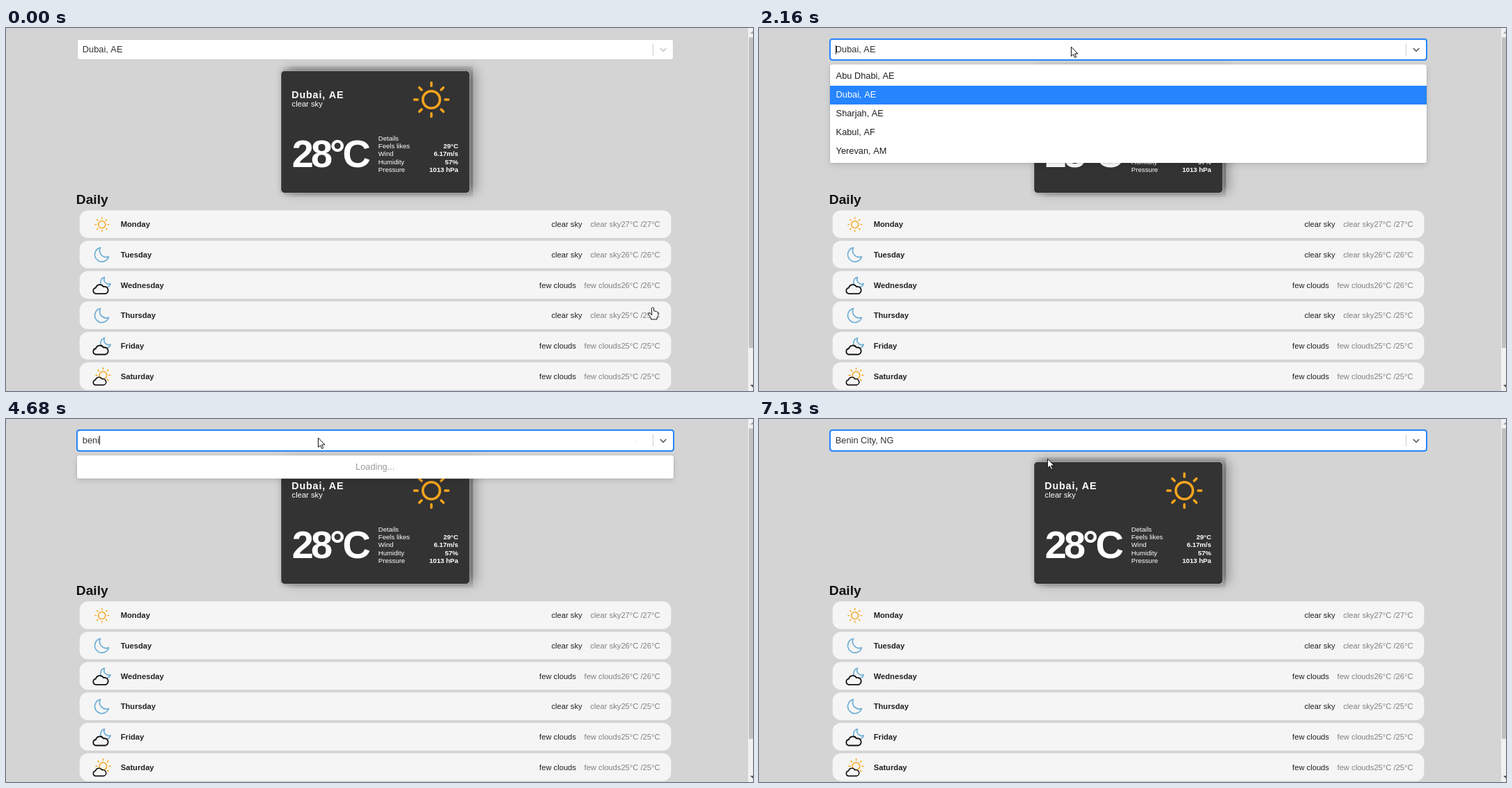
Write an HTML page with a canvas that moves like this. It is 1073 px wide and 522 px high and loops after 8 s.

```html
<!DOCTYPE html>
<html lang="en">
<head>
<meta charset="utf-8">
<title>Weather search</title>
<style>
html, body { margin: 0; width: 100%; height: 100%; overflow: hidden; background: #d4d4d4; }
canvas { display: block; width: 1073px; height: 522px; }
</style>
</head>
<body>
<canvas id="stage"></canvas>
<script>
const W = 1073, H = 522, LOOP = 8000, TICK = 65, BLINK = 490;
const FAMILY = '"Liberation Sans", Arial, sans-serif';
const canvas = document.getElementById('stage');
const ratio = window.devicePixelRatio || 1;
canvas.width = W * ratio;
canvas.height = H * ratio;
const c = canvas.getContext('2d');

const OPEN = 1180, LOADING = 2610, LOADED = 5340, PICK = 7000;
const BOX = { x: 102, y: 16, w: 857, h: 30 };
const typed = [[2540, 'b'], [2870, 'be'], [3200, 'ben'], [3690, 'beni'], [LOADED, 'benin']];
const cities = ['Abu Dhabi, AE', 'Dubai, AE', 'Sharjah, AE', 'Kabul, AF', 'Yerevan, AM'];
const details = [['Details', ''], ['Feels likes', '29°C'], ['Wind', '6.17m/s'],
  ['Humidity', '57%'], ['Pressure', '1013 hPa']];
const days = [
  ['Monday', 'clear sky', 27, sunIcon], ['Tuesday', 'clear sky', 26, moonIcon],
  ['Wednesday', 'few clouds', 26, cloudyMoon], ['Thursday', 'clear sky', 25, moonIcon],
  ['Friday', 'few clouds', 25, cloudyMoon], ['Saturday', 'few clouds', 25, cloudySun]
];
// time, x, y of the pointer tip
const track = [
  [0, 929, 401], [390, 560, 70], [520, 462, 1], [650, 453, 11], [910, 453, 11],
  [1040, 451, 20], [1235, 448, 27], [5980, 448, 27], [6240, 447, 19],
  [6720, 424, 54], [6890, 424, 54], [7085, 414, 57]
];

const moonPath = new Path2D('M-2 -10A10.2 10.2 0 1 0 10 3A9.5 9.5 0 0 1 -2 -10Z');
const cloudPath = new Path2D('M-7 6A4.3 4.3 0 0 1 -7 -2.5A6 6 0 0 1 4 -4A5 5 0 0 1 7 6Z');
const arrowPath = new Path2D('M.5 .5V13.6L3.5 10.8L5.7 15.6L7.8 14.7L5.6 10H9.6Z');
const handPath = new Path2D('M-1.5 1.6Q0 -.6 1.5 1.6V6Q3 5.2 4 6.6Q5.4 5.9 6 7.3' +
  'Q7.8 7 7.8 9V12.5L6 15.5V18H-2.5V16L-6.5 10.5Q-6.4 8.4 -4.3 9.3L-1.5 11.5Z');

function text(s, x, y, size, color, { bold, align = 'left', spacing = 0 } = {}) {
  c.font = `${bold ? 'bold ' : ''}${size}px ${FAMILY}`;
  c.textAlign = align;
  c.letterSpacing = spacing + 'px';
  c.fillStyle = color;
  c.fillText(s, x, y);
}

function box(x, y, w, h, r, color) {
  c.beginPath();
  c.roundRect(x, y, w, h, r);
  c.fillStyle = color;
  c.fill();
}

function shadowBox(x, y, w, h, r, color, dx, dy, blur, alpha) {
  c.save();
  c.shadowColor = `rgba(0,0,0,${alpha})`;
  c.shadowBlur = blur * ratio;
  c.shadowOffsetX = dx * ratio;
  c.shadowOffsetY = dy * ratio;
  box(x, y, w, h, r, color);
  c.restore();
}

function at(x, y, scale, draw) {
  c.save();
  c.translate(x, y);
  c.scale(scale, scale);
  c.lineCap = c.lineJoin = 'round';
  draw();
  c.restore();
}

function outline(path, fill, stroke, width) {
  if (fill) {
    c.fillStyle = fill;
    c.fill(path);
  }
  c.strokeStyle = stroke;
  c.lineWidth = width;
  c.stroke(path);
}

function sun(x, y, scale) {
  at(x, y, scale, () => {
    c.strokeStyle = '#f6a41c';
    c.lineWidth = 3.5;
    c.beginPath();
    c.arc(0, 0, 12.3, 0, 7);
    for (let i = 0; i < 8; i++) {
      const a = i * Math.PI / 4, dx = Math.cos(a), dy = Math.sin(a);
      c.moveTo(dx * 19.8, dy * 19.8);
      c.lineTo(dx * 24.5, dy * 24.5);
    }
    c.stroke();
  });
}

function moon(x, y, scale) {
  at(x, y, scale, () => outline(moonPath, null, '#70b0d6', 1.7 / scale));
}

function cloud(x, y, scale) {
  at(x, y, scale, () => outline(cloudPath, '#f5f5f5', '#111', 1.8));
}

function sunIcon(y) { sun(137.8, y + .4, .41); }
function moonIcon(y) { moon(137.5, y, 1); }
function cloudyMoon(y) { moon(143, y - 4, .72); cloud(136, y + 6.5, 1); }
function cloudySun(y) { sun(139.5, y - 1.5, .43); cloud(134.5, y + 7.5, .86); }

function drawCard() {
  shadowBox(394, 60.5, 273, 178, 6, '#333', 8, -1.6, 16, .3);
  // hide the spread rim under the card
  c.save();
  c.beginPath();
  c.rect(390, 55, 281, 188);
  c.roundRect(395.5, 62, 270, 175, 4.8);
  c.clip('evenodd');
  box(394, 60.5, 273, 178, 6, '#d4d4d4');
  shadowBox(394, -739.5, 273, 178, 6, '#333', 8, 798.4, 16, .3);
  c.restore();
  box(395.5, 62, 270, 175, 4.8, '#333');
  text('Dubai, AE', 410.2, 101, 14.4, '#fff', { bold: true, spacing: .8 });
  text('clear sky', 410.6, 113, 11.2, '#fff');
  text('28°C', 410.8, 200, 56, '#fff', { bold: true, spacing: -4 });
  sun(611, 103, 1);
  details.forEach(([name, value], i) => {
    const y = 162.2 + i * 11.1;
    text(name, 534.8, y, 9.6, '#fff');
    text(value, 649.6, y, 9.6, '#fff', { bold: true, align: 'right' });
  });
}

function drawDays() {
  text('Daily', 100.8, 253, 19.2, '#111', { bold: true });
  days.forEach(([day, sky, deg, icon], i) => {
    const y = 262.2 + i * 43.7, mid = y + 20;
    box(105.7, y, 849.7, 39.7, 12, '#f5f5f5');
    icon(mid);
    text(day, 164.7, mid + 4, 11.2, '#212121', { bold: true });
    const range = `${sky}${deg}°C /${deg}°C`;
    text(range, 939.6, mid + 4, 11.2, '#808080', { align: 'right' });
    const left = 939.6 - c.measureText(range).width;
    text(sky, left - 11.6, mid + 4, 11.2, '#212121', { align: 'right' });
  });
}

function drawScrollbar() {
  box(1066, 0, 7, H, 0, '#f1f1f1');
  box(1067, 13.5, 6, 446.5, 0, '#c1c1c1');
  c.fillStyle = '#a3a3a3';
  c.beginPath();
  c.moveTo(1069, 8);
  c.lineTo(1073, 4);
  c.lineTo(1073, 8);
  c.fill();
  c.fillStyle = '#505050';
  c.beginPath();
  c.moveTo(1069, 513);
  c.lineTo(1073, 513);
  c.lineTo(1073, 517);
  c.fill();
}

function drawSelect(t, tick, pointer) {
  const { x, y, w, h } = BOX;
  const focused = t >= OPEN;
  const hover = pointer.x >= x && pointer.x < x + w && pointer.y >= y && pointer.y < y + h;
  if (focused) box(x - 1, y - 1, w + 2, h + 2, 4.2, '#2684ff');
  else box(x, y, w, h, 3.2, hover ? '#b3b3b3' : '#ccc');
  box(x + 1, y + 1, w - 2, h - 2, 2.4, '#fff');
  box(929, 22.5, 1, 17, 0, '#ccc');

  at(936, 23, .8, () => {
    c.strokeStyle = focused ? '#666' : '#ccc';
    c.lineWidth = 2.2;
    c.beginPath();
    c.moveTo(5.3, 8.4);
    c.lineTo(10, 12.9);
    c.lineTo(14.7, 8.4);
    c.stroke();
  });

  const picked = t >= PICK;
  let input = '', since = OPEN;
  if (!picked) for (const [time, s] of typed) if (t >= time) [since, input] = [time, s];
  const value = picked ? 'Benin City, NG' : 'Dubai, AE';
  text(input || value, 109.8, 35, 12.8, '#333');

  if (focused && !picked && Math.floor((t - since) / BLINK) % 2 === 0) {
    const end = input ? c.measureText(input).width : 0;
    box(Math.round(109.8 + end), input ? 24 : 25, 1, 13, 0, '#222');
  }
  if (t >= LOADING && t < LOADED) drawDots(tick - LOADING);
}

const ease = p => p < .5 ? 2 * p * p : 1 - 2 * (1 - p) * (1 - p);

function drawDots(age) {
  for (let i = 0; i < 3; i++) {
    const own = age - i * 160, p = own / 1000 % 1;
    const alpha = own < 0 ? 1 : p < .4 ? ease(p / .4) : p < .8 ? 1 - ease((p - .4) / .4) : 0;
    c.globalAlpha = Math.max(0, alpha);
    box(903.4 + i * 6.4, 29.4, 3.2, 3.2, 1.6, '#666');
  }
  c.globalAlpha = 1;
}

function drawMenu(t) {
  if (t < OPEN || t >= PICK) return;
  const list = t < typed[0][0];
  const h = list ? 141.4 : 33;
  shadowBox(102, 52.6, 857, h, 3.2, '#fff', 0, 3.2, 9, .12);
  box(101.2, 51.8, 858.6, h + 1.6, 4, 'rgba(0,0,0,.1)');
  box(102, 52.6, 857, h, 3.2, '#fff');
  if (list) {
    cities.forEach((city, i) => {
      const on = i === 1;
      if (on) box(102, 83, 857, 27, 0, '#2684ff');
      text(city, 110.6, 73 + i * 27, 12.8, on ? '#fff' : '#212121');
    });
  } else if (t >= LOADED) {
    box(102, 55.8, 857, 27, 0, '#deebff');
    text('Benin City, NG', 110.6, 73, 12.8, '#212121');
  } else {
    text(t < LOADING ? 'No options' : 'Loading...', 530.2, 73, 12.8, '#999', { align: 'center' });
  }
}

function pointerAt(t) {
  let i = track.findIndex(k => k[0] > t);
  if (i < 0) i = track.length - 1;
  const a = track[i - 1], b = track[i];
  const p = Math.min(1, (t - a[0]) / (b[0] - a[0]));
  return { x: Math.round(a[1] + (b[1] - a[1]) * p), y: Math.round(a[2] + (b[2] - a[2]) * p) };
}

function drawPointer({ x, y }) {
  const overRow = x > 106 && x < 955 && y >= 262 && (y - 262.2) % 43.7 < 39.7;
  at(x, y, 1, () => outline(overRow ? handPath : arrowPath, '#fff', '#111', 1));
}

function render(t) {
  // the screen is sampled at a fixed rate
  const tick = Math.floor(t / TICK + .1) * TICK;
  const pointer = pointerAt(tick);
  c.setTransform(ratio, 0, 0, ratio, 0, 0);
  box(0, 0, W, H, 0, '#d4d4d4');
  drawCard();
  drawDays();
  drawScrollbar();
  drawSelect(t, tick, pointer);
  drawMenu(t);
  drawPointer(pointer);
}

const start = performance.now();
function loop() {
  render((performance.now() - start) % LOOP);
  requestAnimationFrame(loop);
}
loop();
</script>
</body>
</html>
```
